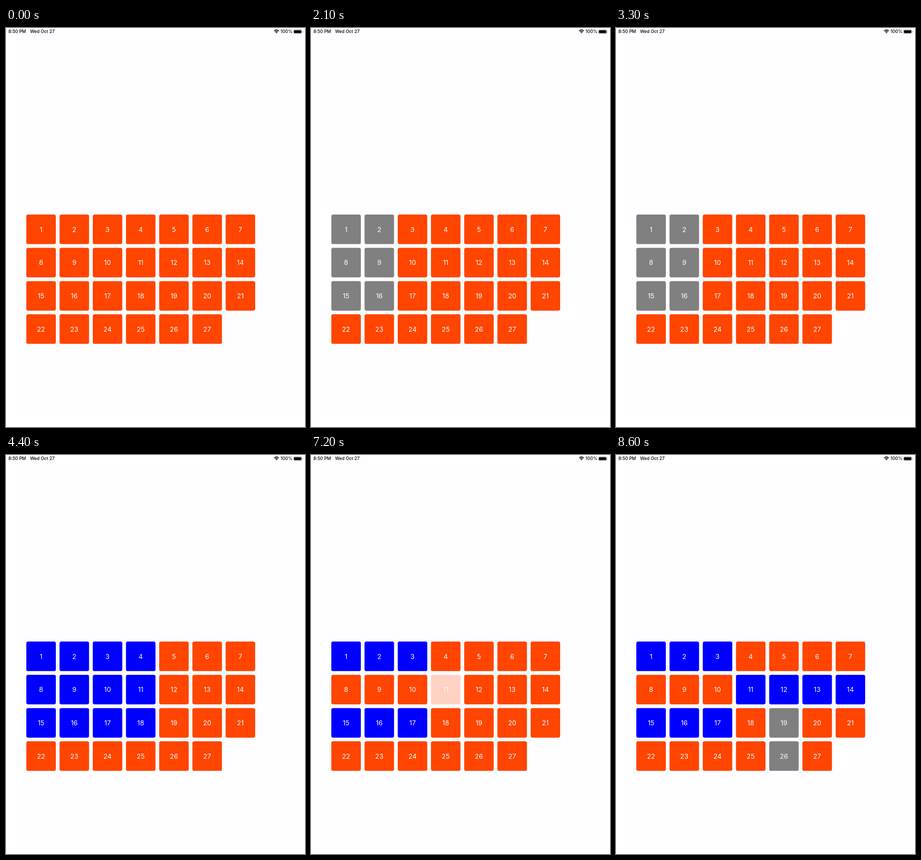
An HTML page that plays this animation: 600x800 px, repeating every 8.9 s.

```html
<!DOCTYPE html>
<html lang="en">
<head>
<meta charset="utf-8">
<title>Drag selection grid</title>
<style>
  html, body { margin: 0; width: 100%; height: 100%; overflow: hidden; background: #fefdff; }
  svg { display: block; width: 600px; height: 800px; font-family: Inter, Roboto, sans-serif; }
  .status { font-size: 12px; font-weight: 500; }
  .tile text { font-size: 18px; fill: #fff; text-anchor: middle; }
</style>
</head>
<body>
<svg viewBox="0 0 810 1080">
  <g class="status">
    <text x="6.3" y="14">8:50 PM</text>
    <text x="65" y="14">Wed Oct 27</text>
    <text x="743.5" y="14">100%</text>
  </g>
  <g fill="none" stroke="#000" stroke-width="2">
    <path d="M726.3 8.2Q732.7 2.2 739.1 8.2M728.7 10.8Q732.7 7.2 736.7 10.8"/>
    <path d="M730.6 12.2Q732.7 10.4 734.8 12.2L732.7 14.4Z" fill="#000" stroke="none"/>
    <rect x="778.5" y="4.5" width="23" height="11" rx="3.3" stroke="#999" stroke-width="1"/>
    <rect x="780" y="6" width="20" height="8" rx="2" fill="#000" stroke="none"/>
    <path d="M803.3 8v4q1.5-.6 1.5-2t-1.5-2" fill="#999" stroke="none"/>
  </g>
  <g id="grid"></g>
</svg>
<script>
const LOOP = 8900, COUNT = 27, COLS = 7;
const IDLE = '#ff4500', ACTIVE = '#808080', CHOSEN = '#0000ff';

// Each drag: anchor tile, press time, [time, tile under finger]..., release time
const drags = [
  { anchor: 1, press: 1000, release: 4400, moves: [
    [1100, 9], [1200, 10], [1300, 19], [1400, 27],
    [1800, 26], [1900, 18], [2000, 17], [2100, 16],
    [2600, 18], [2700, 20],
    [3000, 19], [3100, 18], [3200, 17], [3300, 16],
    [3800, 17], [3900, 18]] },
  { anchor: 4, press: 4900, release: 5400, moves: [[5000, 4], [5100, 11], [5200, 18]] },
  { anchor: 8, press: 6100, release: 6600, moves: [[6300, 8], [6400, 9], [6500, 10]] },
  { anchor: 11, press: 7200, release: 7800, moves: [[7300, 12], [7400, 13], [7500, 14]] },
  { anchor: 19, press: 8300, release: LOOP, moves: [[8400, 19], [8500, 26]] }
];

const col = n => (n - 1) % COLS;
const row = n => Math.floor((n - 1) / COLS);
const between = (v, a, b) => v >= Math.min(a, b) && v <= Math.max(a, b);
const inRect = (n, a, b) => between(col(n), col(a), col(b)) && between(row(n), row(a), row(b));

function add(parent, tag, attrs) {
  const el = document.createElementNS('http://www.w3.org/2000/svg', tag);
  for (const key in attrs) el.setAttribute(key, attrs[key]);
  return parent.appendChild(el);
}

const tiles = Array.from({ length: COUNT }, (_, i) => {
  const n = i + 1;
  const g = add(document.getElementById('grid'), 'g', {
    class: 'tile', transform: `translate(${55 + 90 * col(n)} ${505 + 90 * row(n)})`
  });
  const box = add(g, 'rect', { width: 80, height: 80, rx: 5 });
  add(g, 'text', { x: 40, y: 46.8 }).textContent = n;
  return { n, g, box };
});

function draw(t) {
  for (const { n, g, box } of tiles) {
    let fill = IDLE, opacity = 1;
    for (const { anchor, press, release, moves } of drags) {
      if (t < press) break;
      const move = moves.filter(m => m[0] <= t).pop();
      if (!move) {
        if (n === anchor) opacity = 0.23;
      } else if (inRect(n, anchor, move[1])) {
        fill = t < release ? ACTIVE : fill === CHOSEN ? IDLE : CHOSEN;
      }
    }
    box.setAttribute('fill', fill);
    g.setAttribute('opacity', opacity);
  }
}

const start = performance.now();
function tick() {
  draw((performance.now() - start) % LOOP);
  requestAnimationFrame(tick);
}
tick();
</script>
</body>
</html>
```
